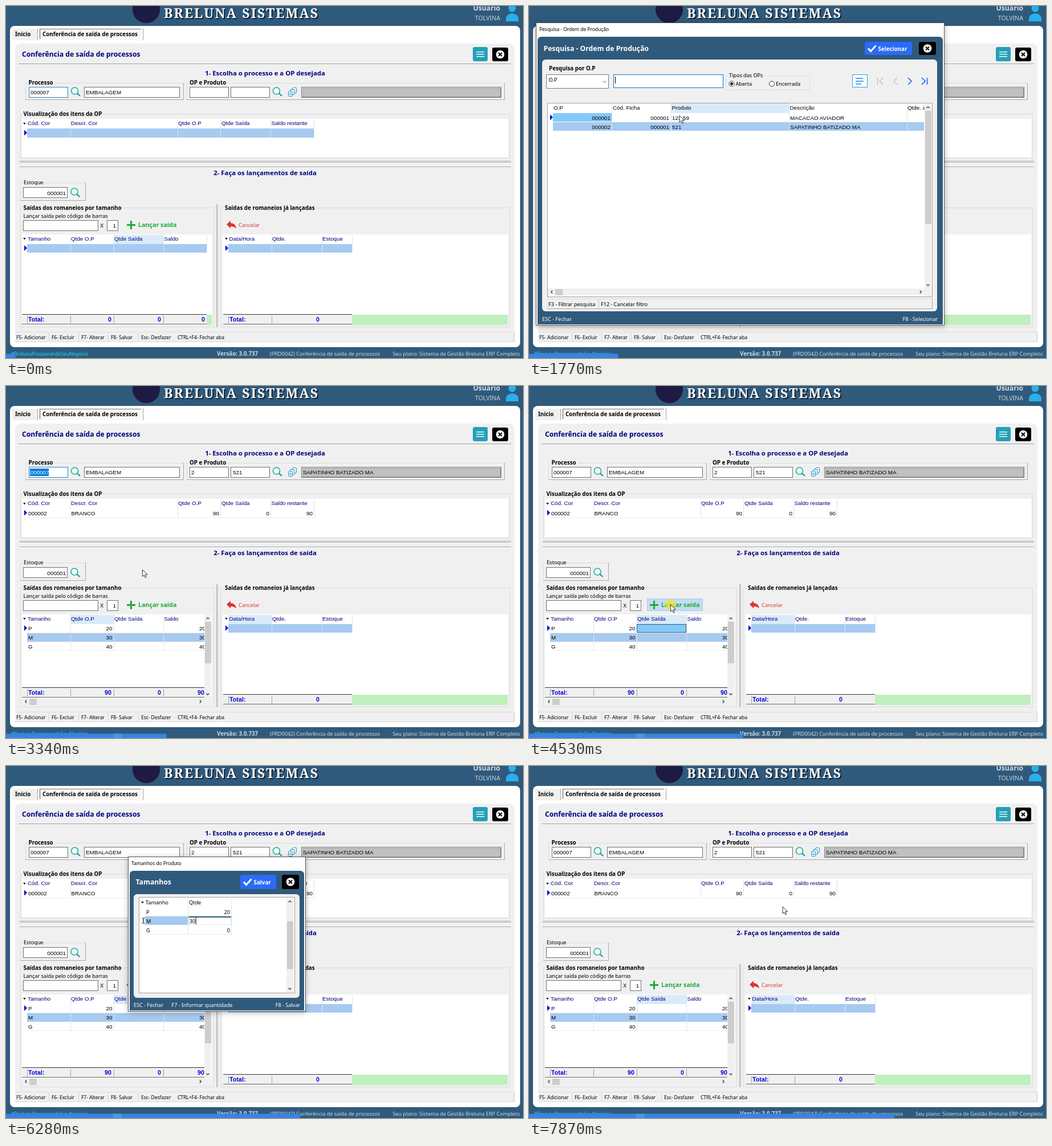
Animation, 907 px wide and 618 px high, one loop 8 s. Source, as an HTML page:

```html
<!DOCTYPE html>
<html lang="pt">
<head>
<meta charset="utf-8">
<title>Conferência de saída</title>
<style>
html, body { margin: 0; width: 100%; height: 100%; overflow: hidden; background: #305a7c; }
svg { display: block; width: 100%; height: 100%; }
text { font: 9.25px "Noto Sans", "Open Sans", sans-serif; letter-spacing: -.01em; white-space: pre; }
.b { font-weight: 700; font-size: 9.8px; letter-spacing: 0; }
.h { font-weight: 700; font-size: 12.2px; letter-spacing: 0; }
.s { font-weight: 700; font-size: 11.35px; letter-spacing: 0; text-anchor: middle; }
.g { font: 9.8px "Liberation Sans", Arial, sans-serif; letter-spacing: 0; }
.t { font: 700 10.6px "Liberation Sans", Arial, sans-serif; letter-spacing: .1px; fill: #0000e0; }
.c { font-size: 8.6px; }
.u { font-size: 10.8px; }
.add { font-weight: 700; font-size: 10.7px; letter-spacing: 0; fill: #1faa3c; }
.e { text-anchor: end; }
.n { fill: #000080; }
.w { fill: #fff; }
.brand { font: 700 23px "Noto Serif", serif; letter-spacing: 2.1px; }
.win { filter: drop-shadow(0 2px 5px rgba(0,0,0,.3)); }
</style>
</head>
<body>
<svg id="stage" viewBox="0 0 907 618"></svg>
<script>
const BLUE = '#305a7c', ROW = '#a6caf0', CELL = '#83c9f8', HOT = '#d9ebf9', FACE = '#f0f0f0', GREY = '#a0a0a0';

// Drawing helpers: all return SVG markup.
const rect = (x, y, w, h, fill, more = '') => `<rect x="${x}" y="${y}" width="${w}" height="${h}" fill="${fill}" ${more}/>`;
const hline = (x, y, x2, c = GREY) => rect(x, y, x2 - x, 1, c);
const vline = (x, y, y2, c = GREY, more = '') => rect(x, y, 1, y2 - y, c, more);
const box = (x, y, x2, y2, fill = '#fff', c = '#707070', more = '') =>
  rect(x + .5, y + .5, x2 - x - 1, y2 - y - 1, fill, `stroke="${c}" ${more}`);
const path = (d, c, w = 1, fill = 'none') => `<path d="${d}" stroke="${c}" stroke-width="${w}" fill="${fill}"/>`;
const shape = (d, fill) => `<path d="${d}" fill="${fill}"/>`;
const text = (x, y, s, cls = '', fill = '') =>
  `<text x="${x}" y="${y}" class="${cls}"${fill && ` style="fill:${fill}"`}>${s}</text>`;
const group = (id, body) => `<g id="${id}">${body}</g>`;
const marker = (x, y) => shape(`M${x} ${y - 5}l5 5l-5 5z`, '#0000e0');
const sortMark = (x, y) => shape(`M${x} ${y}h5l-2.5 3.5z`, '#222');
const frame = (x, y, x2, y2, hard) => box(x, y, x2, y2, 'none', '#dcdcdc') +
  (hard ? hline(x, y2 - 1, x2, '#a8a8a8') + vline(x2 - 1, y, y2, '#a8a8a8') : '');
const legend = (x, y, s, w, cls = 'b') => rect(x - 2, y - 8, w, 10, FACE) + text(x, y, s, cls);
const chevron = (x, y, dx, dy, c = '#333', w = 1.2) => dx
  ? path(`M${x - dx / 2} ${y - Math.abs(dx)}l${dx} ${Math.abs(dx)}l${-dx} ${Math.abs(dx)}`, c, w)
  : path(`M${x - Math.abs(dy)} ${y - dy / 2}l${Math.abs(dy)} ${dy}l${Math.abs(dy)} ${-dy}`, c, w);
const vscroll = (x, y, y2, top, h, id = '') => rect(x, y, 12, y2 - y, FACE) + chevron(x + 6, y + 6, 0, -2.5) +
  chevron(x + 6, y2 - 6, 0, 2.5) + rect(x + 1, top, 11, h, '#cdcdcd', id && `id="${id}"`);
const hscroll = (x, y, x2) => rect(x, y, x2 - x, 12, FACE) + chevron(x + 7, y + 6, -2.5, 0) +
  chevron(x2 - 7, y + 6, 2.5, 0) + rect(x + 13, y + 1, 13, 11, '#cdcdcd');
const heads = (y, list) => list.map(([x, s]) => text(x, y, s, 'g n')).join('');
const seps = (xs, y, y2, c = '#dfe3e8') => xs.map(x => vline(x, y, y2, c)).join('');
const lens = (x, y) => path(`M${x + 4} ${y + 4}l5.5 5`, '#1a8fb5', 2.2) +
  `<circle cx="${x}" cy="${y}" r="6" fill="#f4fbfa" stroke="#18b28e" stroke-width="1.6"/>`;
const closeBtn = (x, y, w, h) => rect(x, y, w, h, '#000', 'rx="3"') +
  `<circle cx="${x + w / 2}" cy="${y + h / 2}" r="7.3" fill="#fff"/>` +
  path(`M${x + w / 2 - 3} ${y + h / 2 - 3}l6 6m0 -6l-6 6`, '#000', 2);
const okBtn = (x, y, w, h, s) => rect(x, y, w, h, '#2a6cf6', 'rx="3"') +
  path(`M${x + 6} ${y + h / 2}l4.5 5l9 -10`, '#fff', 3) + text(x + 23.5, y + h / 2 + 4, s, 'b w');
const totals = (x, x2, y, cols, cells) => rect(x, y, x2 - x, 18, FACE) + hline(x, y, x2, '#333') +
  hline(x, y + 17, x2, '#666') + seps(cols, y + 3, y + 16, GREY) + text(x + 11, y + 12.5, 'Total:', 't') +
  cells.map(([cx, s]) => text(cx, y + 12.5, s, 't e')).join('');

function chrome() {
  const brand = 'BRELUNA SISTEMAS';
  return rect(0, 0, 907, 618, BLUE) +
    '<circle cx="246" cy="6" r="24" fill="#1d1a44"/>' +
    text(279, 23, brand, 'brand', '#10202e') + text(277, 21, brand, 'brand w') +
    text(867, 8, 'Usuário', 'h e', '#d3dde4') + text(867, 25, 'TOLVINA', 'u e', '#c3d0da') +
    '<circle cx="888" cy="4" r="6.5" fill="#29b0ec"/>' + shape('M877 27v-4q0 -9 11 -10q11 1 11 10v4z', '#29b0ec') +
    rect(7, 35, 895, 564, '#fff', 'rx="8"') +
    rect(11, 40, 44, 20, FACE) + vline(55, 40, 60) + text(16, 53, 'Início', 'b') +
    rect(59, 40, 178, 20, '#f8f8f8') + hline(59, 40, 237, '#777') + vline(59, 40, 58, '#555') + vline(240, 39, 60) +
    text(64, 53, 'Conferência de saída de processos', 'b') +
    shape('M16 590V76q0 -10 10 -10H882q10 0 10 10V590z', FACE) +
    text(28, 89, 'Conferência de saída de processos', 'h n') + hline(22, 101, 886) +
    rect(819, 72, 26, 25, '#25a0b8', 'rx="3"') +
    [80, 84, 88].map(y => rect(825, y, 14, 1.4, '#fff')).join('') + closeBtn(853, 73, 28, 24) +
    hline(16, 572, 892, '#dcdcdc') + vline(891, 572, 589, '#c8c8c8') + hline(16, 589, 892, '#d8d8d8') +
    [[18, 'F5- Adicionar'], [80, 'F6- Excluir'], [132, 'F7- Alterar'], [184, 'F8- Salvar'], [237, 'Esc- Desfazer'],
      [301, 'CTRL+F4- Fechar aba']].map(([x, s]) => text(x, 585, s, 'c') +
      (x > 18 && x < 300 ? vline(x - 5, 574, 588, '#d5d5d5') : '')).join('') +
    text(9, 614, '#BrelunaProsperandoSeuNegócio', 'c', '#20dcee') +
    text(370, 614, 'Versão: 3.0.737', 'b', '#ccd7df') +
    text(463, 614, '(PRD0042) Conferência de saída de processos', '', '#ccd7df') +
    text(902, 614, 'Seu plano: Sistema de Gestão Breluna ERP Completo', 'e', '#ccd7df');
}

function orderPart() {
  return text(454.5, 121.5, '1- Escolha o processo e a OP desejada', 's n') +
    frame(34, 135, 312, 165, 1) + legend(39.5, 138, 'Processo', 49) +
    frame(317, 135, 875, 165, 1) + legend(322, 138, 'OP e Produto', 68) +
    box(40, 142, 109, 161, '#fff', '#707070', 'id="field"') + rect(42, 145, 33, 13, '#0078d7', 'id="sel"') +
    '<text id="proc" x="43" y="155" class="g">000007</text>' +
    lens(120.5, 149) + box(137, 142, 305, 161) + text(140, 155, 'EMBALAGEM', 'g') +
    box(322, 142, 391, 161) + box(394, 142, 463, 161) + lens(474.5, 149) +
    [0, 1, 2].map(i => box(502 - 3.5 * i, 143 + 3 * i, 510 - 3.5 * i, 153 + 3 * i, '#eef8fc', '#2492bd', 'rx="1"')).join('') +
    path('M497 153h4m-4 2.5h4', '#2492bd') +
    box(518, 142, 869, 161, FACE) + box(520, 144, 868, 160, '#c0c0c0', '#999') +
    frame(25, 189, 884, 268) + legend(30.5, 192.5, 'Visualização dos itens da OP', 141) + rect(28, 198, 853, 67, '#fff') +
    sortMark(30, 205) + heads(209, [[38, 'Cód. Cor'], [114, 'Descr. Cor'], [302, 'Qtde O.P'], [378, 'Qtde Saída'],
      [465.5, 'Saldo restante']]) +
    rect(37, 215, 503, 16, ROW, 'class="empty"') + seps([113, 301, 376, 464, 540], 199, 231) + marker(32, 222.5) +
    `<g class="full">${text(325, 155, '2', 'g') + text(398, 155, '521', 'g') + text(521, 155, 'SAPATINHO BATIZADO MA', 'g') +
      hline(37, 231, 540, '#eceff2') + text(39, 227, '000002', 'g') + text(114.5, 227, 'BRANCO', 'g') +
      [[374, 90], [462, 0], [538, 90]].map(([x, v]) => text(x, 227, v, 'g e')).join('')}</g>` +
    [272, 274, 282].map(y => hline(24, y, 886) + hline(24, y + 1, 886, '#fff')).join('');
}

function exitPart() {
  const rows = [['P', 20], ['M', 30], ['G', 40]];
  return text(454.5, 296.5, '2- Faça os lançamentos de saída', 's n') +
    frame(25, 310, 140, 342, 1) + legend(31, 313, 'Estoque', 37, '') +
    box(30, 318, 108, 337) + text(105, 332, '000001', 'g e') + lens(120, 326) +
    frame(25, 354, 365, 564) + legend(30.5, 357.5, 'Saídas dos romaneios por tamanho', 174) +
    [369, 371].map(x => vline(x, 348, 564) + vline(x + 1, 348, 564, '#fff')).join('') +
    frame(376, 354, 884, 564) + legend(384, 357.5, 'Saídas de romaneios já lançadas', 161) +
    text(30.5, 372, 'Lançar saída pelo código de barras') +
    box(30, 376, 162, 395) + text(165.5, 389, 'X') + box(177, 376, 197, 395) + text(193, 389, '1', 'g e') +
    box(207, 373, 305, 395, '#c4dcf2', '#a9cdec', 'id="hover"') +
    path('M219.5 377v15M212 384.5h15', '#1faa3c', 3) + text(232, 388, 'Lançar saída', 'add') +
    rect(28, 401, 333, 159, '#fff') + rect(113, 402, 76, 16, HOT, 'id="hotOp"') + rect(189, 402, 87, 16, HOT, 'id="hotOut"') +
    sortMark(30, 407) + heads(412, [[38, 'Tamanho'], [114, 'Qtde O.P'], [190, 'Qtde Saída'], [277.5, 'Saldo']]) +
    rect(37, 418, 315, 15, ROW, 'class="empty"') + marker(32, 425) +
    `<g class="empty">${seps([113, 189, 276, 352], 402, 433) +
      totals(28, 352, 541, [37, 113, 189, 276], [[185, 0], [272, 0], [349, 0]]) + rect(352, 542, 9, 18, '#bff0bd')}</g>` +
    `<g class="full">${rect(37, 433, 311, 16, ROW) + hline(37, 433, 348, '#eceff2') + hline(37, 464, 348, '#eceff2') +
      seps([113, 189, 276], 402, 465) +
      rows.map(([s, v], i) => text(39, 429 + 16 * i, s, 'g') + text(186.5, 429 + 16 * i, v, 'g e') +
        text(350, 429 + 16 * i, v, 'g e')).join('') +
      box(189, 418, 276, 433, CELL, BLUE, 'id="cell"') +
      totals(28, 349, 529, [37, 113, 189, 276], [[185, 90], [272, 0], [348, 90]]) +
      vscroll(348, 402, 547, 414, 73) + hscroll(28, 548, 348) + rect(348, 547, 13, 13, FACE)}</g>` +
    shape('M387 383.5l7 -6.5v4q9 .5 10 10q-3.5 -4.5 -10 -4v3.5z', '#e0332c') +
    text(408, 388, 'Cancelar', '', '#dd3a30') +
    rect(380, 401, 501, 141, '#fff') + rect(390, 402, 76, 16, HOT, 'class="full"') +
    sortMark(384, 407) + heads(412, [[391.5, 'Data/Hora'], [467, 'Qtde.'], [555, 'Estoque']]) +
    rect(390, 418, 217, 15, ROW) + seps([466, 554, 607], 402, 433) + marker(385, 425) +
    totals(381, 607, 541, [390, 466], [[550, 0]]) + rect(607, 542, 273, 18, '#bff0bd');
}

const windowBase = (x, y, x2, y2, inner, headY, title, head) =>
  box(x, y, x2, y2, '#fff', '#555', 'class="win"') + text(x + 6, y + 14.5, title, 'c') +
  shape(`M${x + 3} ${y2 - 2}V${y + 32}q0 -7 7 -7H${x2 - 10}q7 0 7 7V${y2 - 2}z`, BLUE) +
  text(x + 13.5, headY, head, 'h w') + rect(inner[0], inner[1], inner[2] - inner[0], inner[3] - inner[1], FACE, 'rx="6"');

function searchWin() {
  const radio = (x, s, on) => `<circle cx="${x}" cy="136.5" r="4.5" fill="#fff" stroke="#333"/>` +
    (on ? `<circle cx="${x}" cy="136.5" r="2.5" fill="#222"/>` : '') + text(x + 7, 140, s);
  const title = 'Pesquisa - Ordem de Produção';
  const orders = [['000001', '123.59', 'MACACAO AVIADOR'], ['000002', '521', 'SAPATINHO BATIZADO MA']];
  return windowBase(12, 29, 729, 561, [23, 94, 716, 536], 79, title, title) +
    okBtn(589, 63, 83, 23, 'Selecionar') + closeBtn(684, 63, 30, 23) +
    text(35, 113, 'Pesquisa por O.P', 'b') + box(30, 120, 140, 145, '#fff', '#7a7a7a') + text(34.5, 133, 'O.P') +
    chevron(132.5, 133, 0, 3, '#555', 1) + box(148, 120, 341, 144, '#fff', '#0078d7') + vline(151, 124, 136, '#000') +
    frame(345, 122, 493, 148) + legend(351, 125, 'Tipos das OPs', 63, '') +
    radio(355.5, 'Aberta', true) + radio(426, 'Encerrada') +
    box(567, 120, 594, 143, '#fff', '#2a9fd8') + path('M573 127h9m-9 5h14m-14 5h10m-6 -5m4 -5h5', '#1c86e0', 1.6) +
    path('M611.5 126v12M621 126l-6 6l6 6M646 126l-6 6l6 6', '#bdbdbd', 1.3) +
    path('M665 126l6 6l-6 6M689 126l6 6l-6 6M698.5 126v12', '#1767e8', 1.6) +
    box(32, 170, 708, 511, '#fff', GREY) + rect(249, 171, 207, 17, HOT) +
    [[43, 'O.P'], [147, 'Cód. Ficha'], [250.5, 'Produto'], [457.5, 'Descrição'], [664, 'Qtde. a']]
      .map(([x, s]) => text(x, 182, s, 'g')).join('') +
    rect(42, 204, 651, 15, ROW) + rect(42, 188, 103, 15, CELL, 'id="pick1"') + rect(249, 204, 207, 15, CELL, 'id="pick2"') +
    seps([145, 249, 456, 663], 172, 219) + group('pick', marker(37, 195.5)) +
    orders.map(([op, product, name], i) => {
      const y = 199.5 + 16 * i;
      return text(143, y, op, 'g e') + text(246, y, '000001', 'g e') + text(251, y, product, 'g') + text(458, y, name, 'g');
    }).join('') +
    vscroll(694, 172, 496, 184, 199) + hscroll(33, 496, 694) + rect(694, 496, 13, 13, FACE) +
    frame(32, 514, 708, 532, 1) + text(34, 527, 'F3 - Filtrar pesquisa') + vline(122, 515, 530, '#ccc') +
    text(126, 527, 'F12 - Cancelar filtro') + text(23, 553, 'ESC - Fechar', 'w') + text(717, 553, 'F8 - Selecionar', 'w e');
}

function sizeWin() {
  return windowBase(214, 159, 526, 431, [224, 225, 515, 407], 208, 'Tamanhos do Produto', 'Tamanhos') +
    okBtn(411, 191, 63, 25, 'Salvar') + closeBtn(484, 191, 30, 25) +
    box(233, 230, 507, 399, '#fff', GREY) + sortMark(237, 238) + text(245, 243, 'Tamanho') + text(321, 243, 'Qtde') +
    rect(244, 264, 151, 15, ROW) + seps([319, 395], 232, 296) + hline(244, 263, 395, '#eceff2') + hline(244, 295, 395, '#eceff2') +
    ['P', 'M', 'G'].map((s, i) => text(246, 260 + 16 * i, s)).join('') +
    group('edit', box(320, 248, 395, 263, CELL, BLUE, 'id="active"') + rect(320, 248, 75, 2, BLUE, 'id="typing"')) +
    [0, 1, 2].map(i => `<text id="q${i}" y="${260 + 16 * i}"></text>`).join('') +
    vline(0, 250, 262, '#000', 'id="caret"') +
    group('mark', group('rowMark', marker(239, 255.5)) +
      group('editMark', path('M238.5 251h2m1 0h2M241 251.5v8M238.5 260h2m1 0h2', '#000', 1.1))) +
    vscroll(492, 232, 397, 245, 84, 'thumb') +
    text(224, 423, 'ESC - Fechar', 'w') + text(290.5, 423, 'F7 - Informar quantidade', 'w') + text(516, 423, 'F8 - Salvar', 'w e');
}

const svg = document.getElementById('stage');
svg.innerHTML = chrome() + orderPart() + exitPart() + group('search', searchWin()) + group('sizes', sizeWin()) +
  '<circle id="click" r="9" fill="#f5e61e" opacity=".75"/>' +
  group('arrow', path('M0 0v12l2.8 -2.6l2 4.6l2 -.9l-2 -4.5h3.9z', '#222', .9, '#fff')) +
  rect(0, 610.5, 16, 8, '#3b82e6', 'id="bar"') + rect(188, 610.5, 15, 8, '#429be0', 'id="spot"');

const $ = id => document.getElementById(id);
const show = (el, on) => el.setAttribute('visibility', on ? 'inherit' : 'hidden');
const set = (id, attrs) => Object.entries(attrs).forEach(([k, v]) => $(id).setAttribute(k, v));
const full = [...svg.querySelectorAll('.full')], empty = [...svg.querySelectorAll('.empty')];

const LOOP = 8000, STEP = 196.75;
const track = [[390, 796, 205], [980, 474, 149], [1370, 474, 150], [1770, 264, 192], [1960, 256, 209], [2350, 247, 217],
  [2950, 247, 218], [3730, 232, 424], [3930, 232, 424], [4330, 249, 386], [4720, 248, 382], [5300, 446, 262],
  [7270, 446, 262], [7870, 445, 247]];
const clicks = [[1170, 1360], [1960, 2300], [3730, 3930], [4520, 4700]];
const typed = [[5300, 5880, 20], [6080, 6480, 30], [6670, 7070, 40]];
const within = (t, a, b) => t >= a && t < b;

function pointer(t) {
  const i = track.findIndex(p => p[0] > t);
  if (i < 0) return track[track.length - 1].slice(1);
  if (!i) return track[0].slice(1);
  const [a, ax, ay] = track[i - 1], [b, bx, by] = track[i], k = (t - a) / (b - a);
  return [ax + (bx - ax) * k, ay + (by - ay) * k];
}

// A closing window shrinks slightly while it fades.
function windowState(id, t, open, closing, gone, cx, cy) {
  const out = t >= closing;
  show($(id), within(t, open, gone));
  set(id, { opacity: out ? .08 : 1, transform: out ? `translate(${cx * .05} ${cy * .05}) scale(.95)` : '' });
}

function sizeRows(t) {
  const row = within(t, 6480, 7070) ? 2 : t < 5880 ? 0 : 1;
  const shift = { transform: `translate(0 ${16 * row})` };
  let editing = false;
  typed.forEach(([a, b, value], i) => {
    const on = within(t, a, b), q = $('q' + i);
    const s = t < a ? '0' : on && t < a + STEP - 10 ? String(value)[0] : String(value);
    q.textContent = s;
    q.setAttribute('x', on ? 321.5 : 393);
    q.setAttribute('class', on ? '' : 'e');
    if (on) {
      editing = true;
      set('caret', { x: 322 + 5.3 * s.length, y: 250 + 16 * row });
    }
  });
  ['caret', 'typing', 'editMark'].forEach(id => show($(id), editing));
  show($('rowMark'), !editing);
  set('active', { fill: editing ? '#fff' : CELL, stroke: editing ? '#e4e8ec' : BLUE });
  set('edit', shift);
  set('mark', shift);
  set('thumb', { y: 245 + 27.5 * row });
}

function render(ms) {
  const t = Math.floor((ms + 20) / STEP) * STEP + 1;
  const loaded = t >= 2350, selected = within(t, 2350, 3930), second = within(t, 2150, 2600);
  full.forEach(el => show(el, loaded));
  empty.forEach(el => show(el, !loaded));
  show($('sel'), selected);
  set('proc', { fill: selected ? '#fff' : '#000' });
  set('field', { stroke: t < 3730 ? '#2a86d4' : '#707070' });
  show($('hotOp'), within(t, 2350, 3730));
  show($('hotOut'), !within(t, 2350, 3730));
  show($('cell'), within(t, 3730, 4720));
  show($('hover'), within(t, 4320, 4720));
  show($('pick1'), !second);
  show($('pick2'), second);
  set('pick', { transform: second ? 'translate(0 16)' : '' });
  windowState('search', t, 1370, 2350, 2560, 370, 293);
  windowState('sizes', t, 4720, 7670, 7860, 370, 295);
  sizeRows(t);

  const [x, y] = pointer(t), at = { transform: `translate(${x.toFixed(1)} ${y.toFixed(1)})` };
  set('arrow', at);
  set('click', at);
  show($('arrow'), t >= 390 && !within(t, 5300, 7070)); // hidden while typing
  show($('click'), clicks.some(([a, b]) => within(t, a, b)));
  set('bar', { width: (16 + .0794 * t).toFixed(1) });
  show($('spot'), loaded);
}

const start = performance.now();
function tick() {
  render((performance.now() - start) % LOOP);
  requestAnimationFrame(tick);
}
tick();
</script>
</body>
</html>
```
